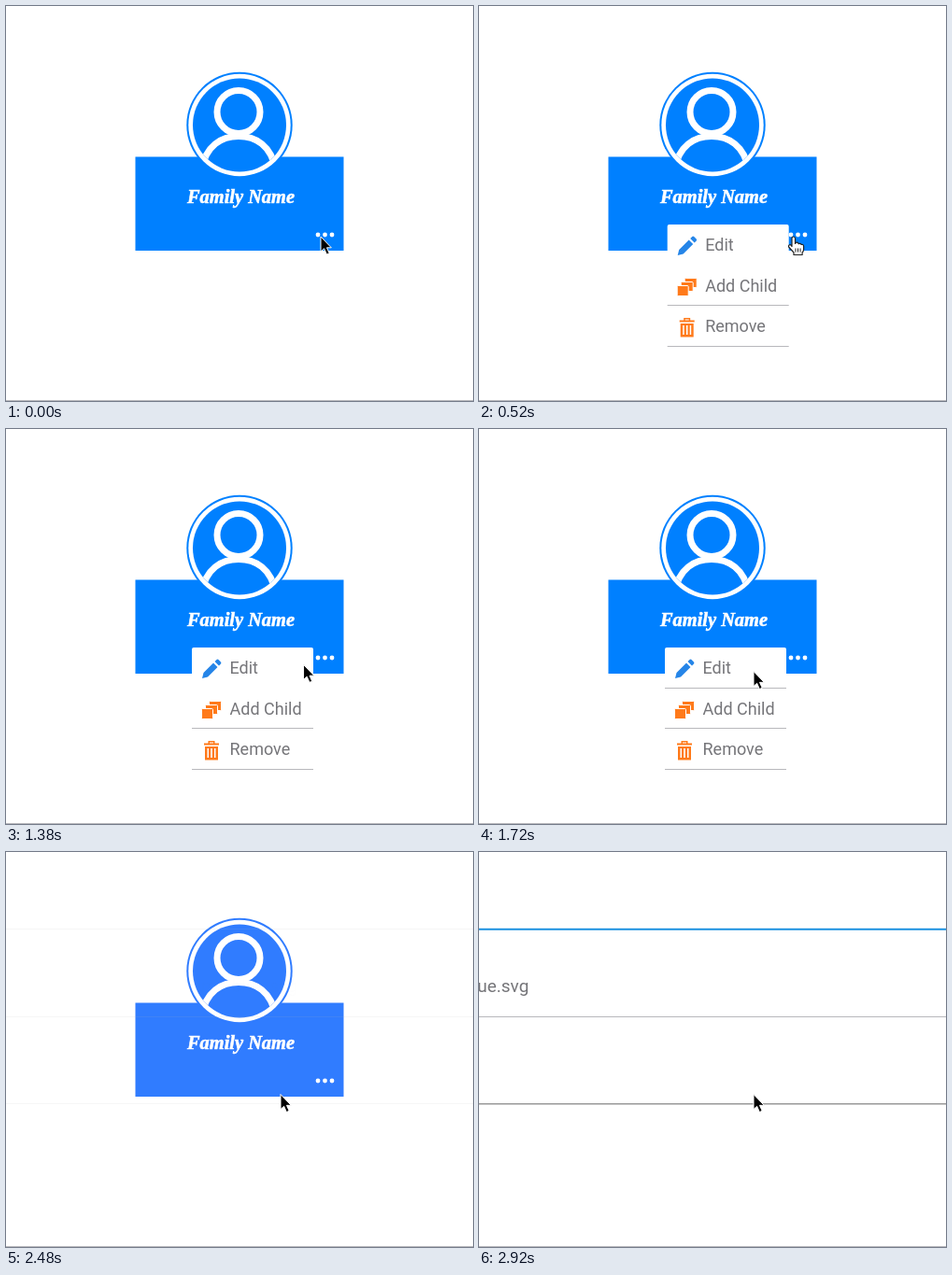
Write an HTML page that moves like this. It is 500 px wide and 423 px high and loops after 2.94 s.

```html
<!DOCTYPE html>
<html lang="en">
<head>
<meta charset="utf-8">
<title>Card menu</title>
<style>
  html, body { margin: 0; width: 100%; height: 100%; overflow: hidden; background: #fff; }
  svg { display: block; width: 500px; height: 423px; }
  text { font: 18px Roboto, Arial, sans-serif; fill: #757579; }
  .name { font: italic bold 20.4px "Liberation Serif", serif; fill: #fff; stroke: #fff; stroke-width: .6; }
  .white { fill: none; stroke: #fff; stroke-width: 7; }
  .orange { fill: #ff7a1a; }
  .rule { stroke: #b8b8bc; }
</style>
</head>
<body>
<svg viewBox="0 0 500 423">
  <defs>
    <clipPath id="disc"><circle cx="250" cy="127.500" r="50"/></clipPath>
  </defs>
  <path class="rule" d="M0 422.500H500"/>

  <g id="card">
    <path d="M138.500 161.500H361.500V262H138.500z"/>
    <circle cx="250" cy="127.500" r="56.700"/>
    <circle cx="250" cy="127.500" r="54.700" fill="#fff"/>
    <circle cx="250" cy="127.500" r="50"/>
    <g class="white" clip-path="url(#disc)">
      <circle cx="249" cy="113.500" r="23"/>
      <path d="M209 176C214 149 231 139.500 249 139.500S284 149 289 176"/>
    </g>
    <text class="name" x="194" y="211">Family Name</text>
    <g fill="#fff">
      <circle cx="334" cy="245" r="2.400"/>
      <circle cx="341.500" cy="245" r="2.400"/>
      <circle cx="349" cy="245" r="2.400"/>
    </g>
  </g>

  <g id="menu">
    <rect x="199" y="234" width="130" height="131" rx="2" fill="#fff"/>
    <path id="hover" class="rule" d="M199 277.500H329"/>
    <path class="rule" d="M199 320.500H329M199 364.500H329"/>
    <path fill="#2585e8" d="M210 267l1.500-6L222 250.500l4.500 4.500L216 265.500zM223.500 249l2-2q1-.8 2 0l2.500 2.500q.8 1 0 2l-2 2z"/>
    <g class="orange" stroke="#fff">
      <rect x="217.500" y="291.500" width="13" height="10" rx="1"/>
      <rect x="213.500" y="295.500" width="13" height="10" rx="1"/>
      <rect x="209.500" y="299.500" width="12" height="11" rx="1"/>
    </g>
    <path class="orange" fill-rule="evenodd" d="M212 336.500h4.500v-2.500h7v2.500h4.500v2h-16zM218 335.500v1h4v-1zM213 340h14v14.500h-14zM215.500 342v10h1.500v-10zM219.200 342v10h1.600v-10zM223 342v10h1.500v-10z"/>
    <text x="239.500" y="262">Edit</text>
    <text x="239.500" y="306">Add Child</text>
    <text x="239.500" y="349">Remove</text>
  </g>

  <g id="form">
    <path class="rule" d="M0 82.500H500M0 176.500H500M0 269.500H500"/>
    <path id="dark" stroke="#999" stroke-width="1.500" d="M0 269.700H500"/>
    <path id="focus" stroke="#1a90e0" stroke-width="2"/>
    <text id="file" y="150" text-anchor="end" style="font-size:19px">img-blue.svg</text>
  </g>

  <g id="cursor" stroke="#fff" stroke-linejoin="round">
    <path id="arrow" d="M0 .5V16.500L3.600 13.300L6.400 19.500L9.200 18.300L6.500 12.300H11.300z"/>
    <g id="hand">
      <path fill="#fff" stroke="#222" stroke-width="1.200" d="M-2 2.500q0-2 1.700-2t1.800 2V8q.5-1.500 2-1.300t1.600 1.500q2-1 3 .8q2.300-.6 2.500 1.700V14q0 2-1.500 3.500V20H0v-2.500L-5 12q-1.200-1.800.2-2.600T-2 11z"/>
      <path stroke="#222" d="M2 13v4M4.500 13v4M7 13v4"/>
    </g>
  </g>
</svg>
<script>
const LOOP = 2940;
const el = id => document.getElementById(id);
const ramp = (t, a, b) => Math.min(1, Math.max(0, (t - a) / (b - a)));
const smooth = k => k * k * (3 - 2 * k);
const fade = (id, value) => el(id).setAttribute('opacity', value);
const move = (id, x, y) => el(id).setAttribute('transform', `translate(${x} ${y})`);

function draw(t) {
  // The card turns violet while it fades.
  fade('card', 1 - ramp(t, 2420, 2740));
  el('card').setAttribute('fill', `rgb(0 ${128 * (1 - ramp(t, 2420, 2640))} 255)`);

  // The menu glides in from the right and settles.
  fade('menu', ramp(t, 280, 420) * (1 - ramp(t, 2380, 2480)));
  move('menu', t < 800 ? Math.min(30, 30 * Math.exp((280 - t) / 100)) : 0, 0);
  fade('hover', t >= 1600 ? 1 : 0);

  // The next page replaces the card.
  fade('form', ramp(t, 2460, 2640));
  fade('file', ramp(t, 2460, 2740));
  fade('dark', ramp(t, 2720, 2900));
  const half = 250 * smooth(ramp(t, 2700, 2880));
  el('focus').setAttribute('d', `M${250 - half} 82.700H${250 + half}`);
  el('file').setAttribute('x', 52 + Math.min(260, 35 * Math.exp((2660 - t) / 80)));

  const go = smooth(ramp(t, 1200, 1600));
  move('cursor', 337 - 43 * go, 246.500 + 12.500 * go);
  const hand = t >= 120 && t < 1320;
  fade('hand', hand ? 1 : 0);
  fade('arrow', hand ? 0 : 1);
}

const start = performance.now();
function tick() {
  draw((performance.now() - start) % LOOP);
  requestAnimationFrame(tick);
}
tick();
</script>
</body>
</html>
```
